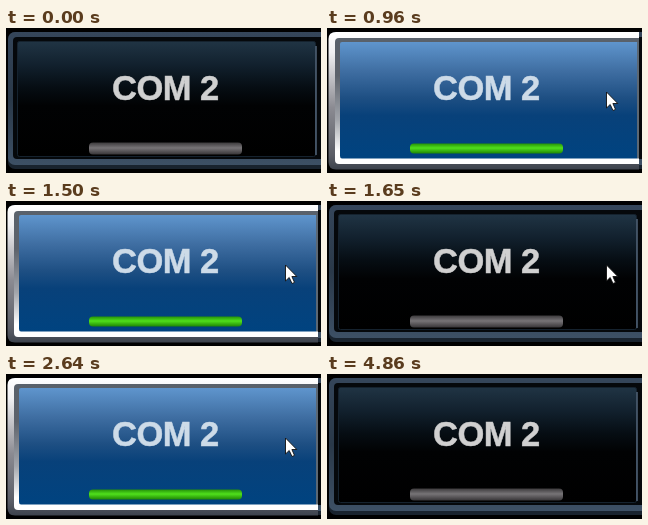
These frames come from a looping animation (315 px wide and 145 px high, 5250 ms). An HTML page:

```html
<!DOCTYPE html>
<html lang="en">
<head>
<meta charset="utf-8">
<title>COM 2 button</title>
<style>
  html, body { margin: 0; width: 100%; height: 100%; overflow: hidden; background: #000; }
  svg { display: block; width: 100vw; height: 100vh; }
  text {
    font: bold 34.5px "Liberation Sans", Arial, sans-serif;
    letter-spacing: -.5px;
    stroke: currentColor; stroke-width: .5; fill: currentColor;
  }
</style>
</head>
<body>
<svg viewBox="0 0 315 145">
  <defs>
    <linearGradient id="rimOff" x2="0" y2="1">
      <stop stop-color="#35465a"/>
      <stop offset=".5" stop-color="#2a3949"/>
      <stop offset="1" stop-color="#3d5065"/>
    </linearGradient>
    <linearGradient id="panelOff" x2="0" y2="1">
      <stop stop-color="#203444"/>
      <stop offset=".2" stop-color="#12212e"/>
      <stop offset=".4" stop-color="#060d13"/>
      <stop offset=".56" stop-color="#010203"/>
      <stop offset="1" stop-color="#000"/>
    </linearGradient>
    <linearGradient id="barOff" x2="0" y2="1">
      <stop stop-color="#3c3a3c"/>
      <stop offset=".45" stop-color="#777477"/>
      <stop offset="1" stop-color="#383638"/>
    </linearGradient>
    <linearGradient id="rimOn" x2="0" y2="1">
      <stop stop-color="#fff"/>
      <stop offset=".15" stop-color="#f0f0f2"/>
      <stop offset=".55" stop-color="#8b8b92"/>
      <stop offset=".9" stop-color="#5a5d66"/>
      <stop offset="1" stop-color="#3c424c"/>
    </linearGradient>
    <linearGradient id="bevelOn" x2="0" y2="1">
      <stop stop-color="#59616b"/>
      <stop offset=".3" stop-color="#5c626b"/>
      <stop offset=".65" stop-color="#a3a6ac"/>
      <stop offset=".9" stop-color="#fff"/>
    </linearGradient>
    <linearGradient id="panelOn" x2="0" y2="1">
      <stop stop-color="#5f95cd"/>
      <stop offset=".25" stop-color="#3f6ea2"/>
      <stop offset=".48" stop-color="#1e4f83"/>
      <stop offset=".63" stop-color="#08417a"/>
      <stop offset="1" stop-color="#004380"/>
    </linearGradient>
    <linearGradient id="barOn" x2="0" y2="1">
      <stop stop-color="#259208"/>
      <stop offset=".45" stop-color="#50e01c"/>
      <stop offset="1" stop-color="#1f8604"/>
    </linearGradient>
  </defs>

  <rect width="315" height="145"/>
  <g id="off">
    <rect x="2" y="4" width="330" height="137" rx="7" fill="#19232e"/>
    <rect x="2" y="4" width="330" height="133" rx="7" fill="url(#rimOff)"/>
    <rect x="7" y="9" width="330" height="122" rx="4" fill="#05080b"/>
    <rect x="11.5" y="13.5" width="298" height="115" rx="2" fill="url(#panelOff)" stroke="#15222e"/>
    <path d="M310 18V127" stroke="#52657a" stroke-width="1.5"/>
    <rect x="83" y="114.5" width="153" height="12" rx="4" fill="url(#barOff)"/>
    <text x="106" y="72" color="#d0d0d0">COM 2</text>
  </g>
  <g id="on">
    <path d="M312 4H9Q1.5 4 1.5 11V134Q1.5 141.5 9 141.5H312Z" fill="url(#rimOn)"/>
    <path d="M312 10H12Q8 10 8 14V132Q8 136 12 136H312Z" fill="url(#bevelOn)"/>
    <path d="M310 14H15Q13 14 13 16V128Q13 130.5 15 130.5H310Z" fill="url(#panelOn)"/>
    <path d="M311 14V130.5" stroke="#5c6874" stroke-width="2"/>
    <rect x="83" y="115.5" width="153" height="10" rx="4" fill="url(#barOn)"/>
    <text x="106" y="72" color="#cddbe8">COM 2</text>
  </g>
  <path id="cursor" d="M.5 .5V16.5L4.2 13 7 19 9.5 17.9 6.9 12H11.8Z" fill="#fff" stroke="#111" stroke-width=".9"/>
</svg>
<script>
  const LOOP = 5250;
  const lit = [[690, 780], [960, 1110], [1500, 1650], [2040, 2160], [2640, 4530]];
  // [time, x, y] of the pointer tip; each place holds until the next
  const pointer = [
    [0, 330, 58], [210, 309, 58], [240, 301, 59], [270, 294, 61],
    [300, 287, 63], [330, 282, 63.5], [390, 279, 63.5],
    [4770, 285, 62], [4800, 295, 59], [4830, 307, 55], [4860, 330, 55]
  ];
  const [on, cursor] = ["on", "cursor"].map(id => document.getElementById(id));

  function draw() {
    const t = performance.now() % LOOP;
    const isLit = lit.some(([from, to]) => t >= from && t < to);
    on.setAttribute("visibility", isLit ? "visible" : "hidden");
    const [, x, y] = pointer.findLast(([start]) => t >= start);
    cursor.setAttribute("transform", `translate(${x} ${y})`);
    requestAnimationFrame(draw);
  }
  draw();
</script>
</body>
</html>
```
